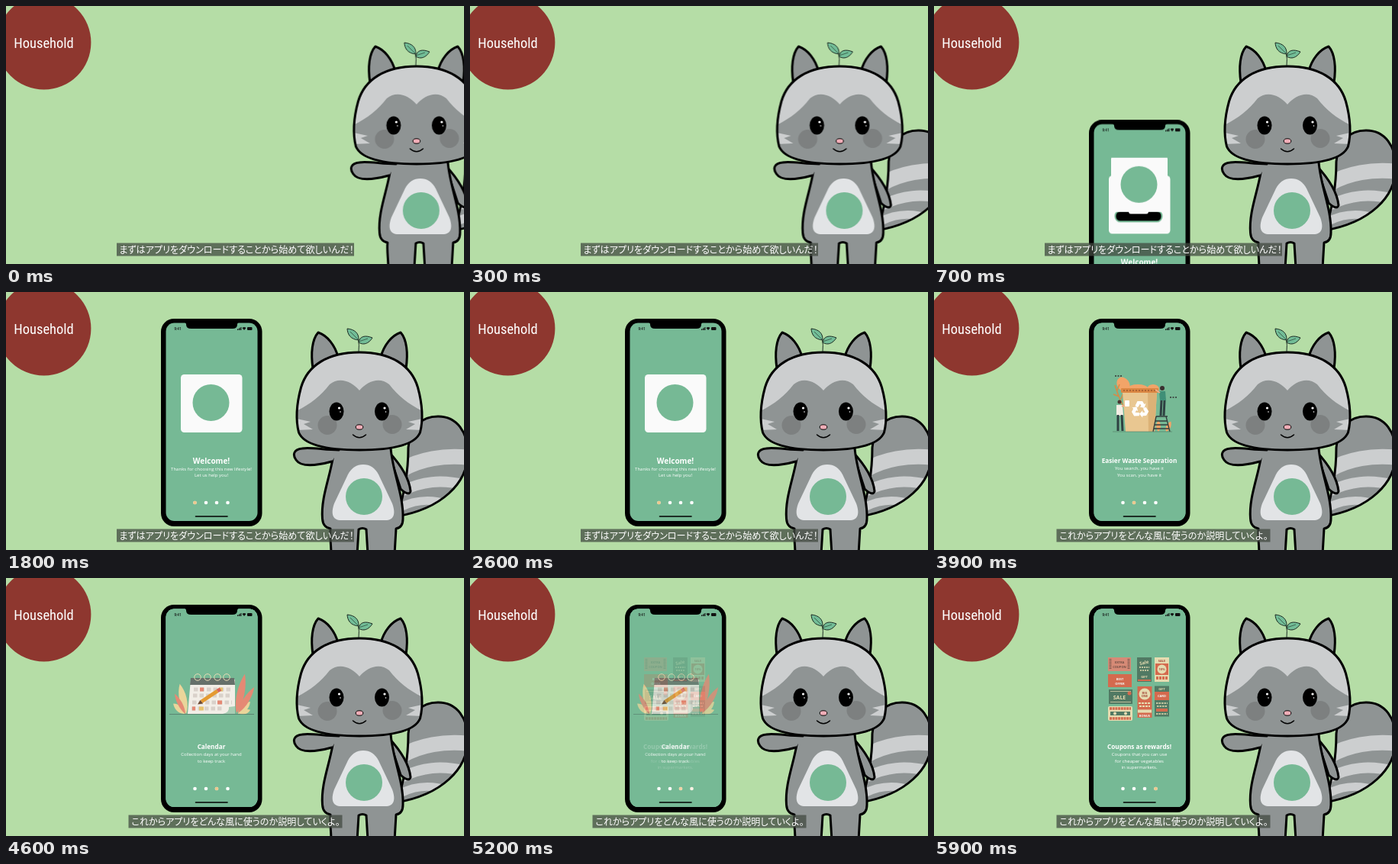
An HTML page that plays this animation: 600x338 px, repeating every 6000 ms.

```html
<!DOCTYPE html>
<html lang="ja">
<head>
<meta charset="utf-8">
<title>Household</title>
<style>
html, body { margin: 0; width: 100%; height: 100%; overflow: hidden; background: #b5dda6; }
svg { display: block; width: 100vw; height: 100vh; }
text { font-family: "Open Sans", "Noto Sans", sans-serif; text-anchor: middle; fill: #fff; }
.line { fill: none; stroke: #000; stroke-width: 3; stroke-linecap: round; stroke-linejoin: round; }
.fur { fill: #8f9494; stroke: #000; stroke-width: 3; stroke-linejoin: round; stroke-linecap: round; }
.pale { fill: none; stroke: #cccecf; }
.title { font: 400 18.5px "Roboto Condensed", Roboto, sans-serif; font-stretch: condensed; }
.sub text { font: 12.1px "Noto Sans CJK JP", "Noto Sans CJK", sans-serif; font-feature-settings: "palt"; }
.sub rect { fill: #424a40; fill-opacity: .75; }
.head { font-size: 8.2px; font-weight: 700; }
.body { font-size: 6px; }
.tiny { font-size: 4px; font-weight: 700; }
.on { fill: #ecc88e; }
.cream { fill: #efdfb4; }
.red { fill: #dc6549; }
.dark { fill: #4f7560; }
.slide, .phone, .panel, .sub, .screen { animation: 6s linear infinite; }
.slide { animation-name: slide; }
.phone { animation-name: rise; }
.panel { animation-name: lead; }
.first { animation-name: before; }
.second { animation-name: after; }
.waste { animation-name: waste; }
.calendar { animation-name: calendar; }
.coupons { animation-name: coupons; }
@keyframes slide {
  0% { transform: translateX(75px); animation-timing-function: ease-out; }
  9.5%, 100% { transform: none; }
}
@keyframes rise {
  0%, 5% { transform: translateY(304px); animation-timing-function: ease-in-out; }
  16.667%, 100% { transform: none; }
}
@keyframes lead {
  0%, 5% { transform: translateY(-68px); animation-timing-function: ease-in-out; }
  16.667%, 100% { transform: none; }
}
@keyframes before { 0%, 48.3% { opacity: 1; } 48.31%, 100% { opacity: 0; } }
@keyframes after { 0%, 48.3% { opacity: 0; } 48.31%, 100% { opacity: 1; } }
@keyframes waste { 0%, 48.3% { opacity: 0; } 51.5%, 100% { opacity: 1; } }
@keyframes calendar { 0%, 66% { opacity: 0; } 69%, 100% { opacity: 1; } }
@keyframes coupons { 0%, 86% { opacity: 0; } 89%, 100% { opacity: 1; } }
</style>
</head>
<body>
<svg viewBox="0 0 600 338">
<defs>
  <path id="skull" d="M463 79C504 79 531 96 539.500 125C545.500 147 546.500 168 542.500 184C535 202 500 207 463 207C426 207 391 202 383.500 184C379.500 168 380.500 147 386.500 125C395 96 422 79 463 79Z"/>
  <path id="tail" d="M527 204C529 177 544 163 566 163C591 163 605 184 605 211C605 251 570 284 512 294C521 268 527 240 527 204Z"/>
  <clipPath id="inSkull"><use href="#skull"/></clipPath>
  <clipPath id="inTail"><use href="#tail"/></clipPath>
  <path id="ear" class="fur" d="M402 100C399 80 401 62 409 53C421 57 431 70 435 85Z"/>
  <path id="tuft" d="M376 165L399 170L390 173L402 180L378 181Z" fill="#cccecf"/>
  <g id="base">
    <rect x="209.500" y="40.500" width="120" height="259.500" rx="11" fill="#76b995"/>
    <g fill="#fff">
      <circle cx="247.5" cy="276" r="2.3"/><circle cx="262" cy="276" r="2.3"/>
      <circle cx="276" cy="276" r="2.3"/><circle cx="290.5" cy="276" r="2.3"/>
    </g>
    <path d="M248.500 294H290" stroke="#000" stroke-width="1.6" stroke-linecap="round"/>
  </g>
  <path id="arrow" d="M-3.500 -9H3L5.500 -5L7.500 -6L5.500 0L-.5 -1.500L1.500 -2.700L0 -5.500L-3 -.8L-6.500 -3Z"/>
  <path id="leaf" d="M0 0C-7 -7 -6 -18 0 -25C6 -18 7 -7 0 0Z"/>
</defs>

<rect width="600" height="338" fill="#b5dda6"/>
<circle cx="49.700" cy="47.800" r="61.700" fill="#8e372f"/>
<text class="title" x="49.500" y="54.500">Household</text>

<g class="phone">
  <rect x="203" y="35" width="132.500" height="272" rx="17"/>

  <g>
    <use href="#base"/>
    <circle class="on" cx="247.500" cy="276" r="2.300"/>
    <rect x="229" y="108" width="80.500" height="76" rx="4.500" fill="#fafafa"/>
    <rect x="237.500" y="154" width="61" height="14" rx="6.500" stroke="#76b995" stroke-width="2"/>
    <rect x="255" y="152" width="26" height="6" rx="3" fill="#fafafa"/>
    <g class="panel">
      <rect x="232" y="110" width="74" height="71" rx="1" fill="#fafafa"/>
      <circle cx="268.500" cy="145" r="24" fill="#76b995"/>
    </g>
    <text class="head" x="269" y="224.500" style="font-size:10px">Welcome!</text>
    <text class="body" x="269" y="233.500">Thanks for choosing this new lifestyle!</text>
    <text class="body" x="269" y="242">Let us help you!</text>
  </g>

  <g class="screen waste">
    <use href="#base"/>
    <circle class="on" cx="262" cy="276" r="2.300"/>
    <g fill="#f2a468">
      <ellipse cx="248" cy="121" rx="8" ry="10" transform="rotate(-35 248 121)"/>
      <ellipse cx="267" cy="126" rx="13" ry="5"/>
      <ellipse cx="287" cy="127" rx="8" ry="6"/>
      <use href="#leaf" transform="translate(294 183) scale(.6)"/>
      <use href="#leaf" transform="translate(304 183) rotate(25) scale(.6)"/>
    </g>
    <path d="M248 150Q241 136 237 122M243 137L235 134M245 140L249 130M240 129L243 121" fill="none" stroke="#d98a45" stroke-width="1.500"/>
    <path d="M247 131H292L289 183H251Z" fill="#e9c791"/>
    <path d="M280 131H292L289 183H281Z" fill="#dcb277"/>
    <rect x="245" y="126" width="49" height="6" rx="1" fill="#db8743"/>
    <path d="M248 129H292" stroke="#9e592f" stroke-width="1.500" stroke-dasharray="2 2"/>
    <g fill="#fff" transform="translate(270 154)">
      <use href="#arrow" transform="translate(0 -2)"/>
      <use href="#arrow" transform="rotate(120) translate(0 -2)"/>
      <use href="#arrow" transform="rotate(240) translate(0 -2)"/>
    </g>
    <circle cx="243" cy="144" r="2.500" fill="#4a3530"/>
    <path d="M239 148H247L248 162H239Z" fill="#f4eee4"/>
    <path d="M246 150L254 147" stroke="#efb08a" stroke-width="2"/>
    <rect x="250" y="142" width="6" height="8" rx="1" fill="#fff"/>
    <path d="M241 161V182M246 161L247 182" stroke="#2e4142" stroke-width="3"/>
    <circle cx="299" cy="126" r="3" fill="#3a3030"/>
    <path d="M295 130H303L304 142H296Z" fill="#3f8f77"/>
    <path d="M296 132L290 128" stroke="#efb08a" stroke-width="2"/>
    <path d="M298 142L297 162M302 142L301 162" stroke="#2e4142" stroke-width="3"/>
    <path d="M291 163H306M291 163L287 183M304 163L309 183M290 169H306M289 174H307M288 179H308" fill="none" stroke="#323d3d" stroke-width="1.300"/>
    <path d="M237 110H246M309 138H318" stroke="#333" stroke-width="1.500" stroke-dasharray="2 1.500"/>
    <path d="M234 183H312" stroke="#56836c" stroke-width=".7"/>
    <text class="head" x="269" y="223.500">Easier Waste Separation</text>
    <text class="body" x="269" y="233">You search, you have it</text>
    <text class="body" x="269" y="241.500">You scan, you have it</text>
  </g>

  <g class="screen calendar">
    <use href="#base"/>
    <circle class="on" cx="276" cy="276" r="2.300"/>
    <g fill="#ead59a">
      <use href="#leaf" transform="translate(236 178) rotate(-12) scale(1 1.600)"/>
      <use href="#leaf" transform="translate(234 178) rotate(-48) scale(.8)"/>
      <use href="#leaf" transform="translate(304 178) rotate(45) scale(.9)"/>
      <use href="#leaf" transform="translate(306 178) rotate(70) scale(.6)"/>
    </g>
    <g fill="#e58974">
      <use href="#leaf" transform="translate(235 178) rotate(-28) scale(.6 1.200)"/>
      <use href="#leaf" transform="translate(302 177) rotate(12) scale(1 2.100)"/>
      <use href="#leaf" transform="translate(304 177) rotate(32) scale(.8 1.600)"/>
    </g>
    <path d="M214 178.500H325" stroke="#55796a" stroke-width=".8"/>
    <path d="M242 133H300V178H238Z" fill="#f2eee7"/>
    <path d="M242 131H299L300 140H241Z" fill="#66706a"/>
    <g fill="none" stroke="#e9dcb5" stroke-width="1">
      <circle cx="251" cy="130" r="4.300"/><circle cx="264" cy="130" r="4.300"/>
      <circle cx="277" cy="130" r="4.300"/><circle cx="289" cy="130" r="4.300"/>
    </g>
    <path d="M246 146H296M245 154H296M244 163H296M243 171H284" stroke="#d9d1ca" stroke-width="5" stroke-dasharray="5.500 3"/>
    <path d="M254 146H259M277 163H283M244 171H248" stroke="#e58974" stroke-width="5"/>
    <path d="M279 146H284M253 171H259" stroke="#e7c36f" stroke-width="5"/>
    <path d="M300 168V178H284Q293 176 292 169Z" fill="#a7cdb3"/>
    <path d="M256 162L277 148" stroke="#e49a32" stroke-width="5"/>
    <path d="M277 148L281 145.500" stroke="#d76559" stroke-width="5"/>
    <path d="M254.500 160L258 164.500L251 165.500Z" fill="#6b4933"/>
    <text class="head" x="269" y="223.500">Calendar</text>
    <text class="body" x="269" y="233">Collection days at your hand</text>
    <text class="body" x="269" y="241.500">to keep track</text>
  </g>

  <g class="screen coupons">
    <use href="#base"/>
    <circle class="on" cx="290.500" cy="276" r="2.300"/>
    <g opacity=".93">
      <rect x="228" y="104" width="30" height="18" fill="#de8774"/>
      <path d="M231 106V120M255 106V120" stroke="#784f46" stroke-width="3" stroke-dasharray="1 1"/>
      <text class="tiny" x="243" y="112" style="fill:#6e473f">EXTRA</text>
      <text class="tiny" x="243" y="118" style="fill:#6e473f">COUPON</text>
      <rect class="red" x="228" y="126" width="31" height="17"/>
      <text class="tiny" x="243.500" y="133.500">BEST</text>
      <text class="tiny" x="243.500" y="139.500">OFFER</text>
      <rect class="dark" x="229" y="146" width="31" height="19"/>
      <path d="M231 148.500H258M231 162.500H258" stroke="#efdfb4" stroke-width=".7"/>
      <text x="243" y="158.500" style="font-size:7px;font-weight:700;fill:#efdfb4">SALE</text>
      <circle class="red" cx="256" cy="151" r="2.500"/>
      <rect class="cream" x="228" y="168" width="32" height="19" rx="2"/>
      <path d="M230 171H258M230 184H258" stroke="#dc6549" stroke-width="3.500" stroke-dasharray="3 .7"/>
      <rect class="dark" x="231" y="175" width="26" height="5"/>
      <circle class="cream" cx="237" cy="177.500" r="2"/><circle class="cream" cx="251" cy="177.500" r="2"/>

      <rect class="dark" x="266" y="104" width="19" height="32"/>
      <text class="tiny" x="275.500" y="113" style="font-size:6px;fill:#efdfb4" transform="rotate(-12 275 112)">Sale</text>
      <path d="M269 117H282M270 121H281" stroke="#efdfb4" stroke-width="1.500" stroke-dasharray="2 1"/>
      <text class="tiny" x="275.500" y="130.500" style="fill:#efdfb4">GIFT</text>
      <path d="M267 134H284" stroke="#dc6549" stroke-width="2"/>
      <rect class="red" x="266.500" y="142" width="19" height="41"/>
      <circle class="cream" cx="276" cy="152" r="7.500"/>
      <text class="tiny" x="276" y="151.500" style="fill:#a94534">BIG</text>
      <text class="tiny" x="276" y="156" style="fill:#a94534">ONE</text>
      <path d="M268 164H284M269 168H283" stroke="#efdfb4" stroke-width="2" stroke-dasharray="3 1"/>
      <rect class="cream" x="267" y="172.500" width="18" height="4"/>
      <text class="tiny" x="276" y="181.500">BONUS</text>

      <rect class="cream" x="289" y="104" width="19" height="32"/>
      <rect class="red" x="290" y="112" width="17" height="15"/>
      <circle class="cream" cx="298.500" cy="119.500" r="6"/>
      <text class="tiny" x="298.500" y="121" style="fill:#a94534">10%</text>
      <text class="tiny" x="298.500" y="110" style="fill:#a94534">SALE</text>
      <path d="M291 131H306" stroke="#dc6549" stroke-width="4" stroke-dasharray="3 1"/>
      <rect class="dark" x="289" y="141.500" width="19" height="40"/>
      <rect class="red" x="289" y="149" width="19" height="11"/>
      <text class="tiny" x="298.500" y="147" style="fill:#efdfb4">GIFT</text>
      <text class="tiny" x="298.500" y="156">CARD</text>
      <path d="M291 164H306M292 168H305M291 178H306" stroke="#efdfb4" stroke-width="1.500" stroke-dasharray="2.500 1"/>
      <rect class="red" x="291" y="171" width="15" height="4"/>
    </g>
    <text class="head" x="269" y="223.500">Coupons as rewards!</text>
    <text class="body" x="269" y="233">Coupons that you can use</text>
    <text class="body" x="269" y="241.500">for cheaper vegetables</text>
    <text class="body" x="269" y="250">in supermarkets.</text>
  </g>

  <path d="M232 39H307Q303 40 303 42.500Q303 48 296.500 48H242.500Q236 48 236 42.500Q236 40 232 39Z"/>
  <text x="225" y="50" style="font-size:4.500px;font-weight:600;fill:#111">9:41</text>
  <path d="M303.500 50V48.500M305 50V47.700M306.500 50V46.800M308 50V46" stroke="#111"/>
  <path d="M309.500 47Q312 45 314.500 47L312 50Z" fill="#111"/>
  <rect x="316" y="46" width="6.500" height="4" rx="1" fill="#111"/>
</g>

<g class="slide">
  <use href="#tail" fill="#8f9494"/>
  <g class="pale" clip-path="url(#inTail)">
    <path d="M518 233C542 219 574 213 608 217" stroke-width="20"/>
    <path d="M518 261C545 248 570 245 602 253" stroke-width="14"/>
    <path d="M510 286C532 272 554 270 580 278" stroke-width="11"/>
  </g>
  <use href="#tail" class="line"/>

  <path class="fur" d="M501 209C515 224 528 242 530 261C529 266 523 264 517 258Z"/>
  <path class="fur" d="M430 204C428 235 412 266 414.500 297C415 305 419 309 425 310C424 320 426 331 426 344H460L462 311Q467 308 472 311L474 344H509L511 310C517 309 520 304 520 297C521 266 506 235 504 204Z"/>
  <path d="M468 226C477 226 483 230 488 239L506 277C511 291 508 299 497 299H439C428 299 425 291 430 277L448 239C453 230 459 226 468 226Z" fill="#e2e4e6"/>
  <circle cx="469" cy="268" r="24" fill="#76b995"/>
  <path class="fur" d="M436 207C417 207 399 203 388 205C377 206 375 213 380 220C386 229 405 228 427 222" style="stroke-linejoin:round"/>

  <use href="#ear"/>
  <use href="#ear" transform="translate(926) scale(-1 1)"/>
  <use href="#skull" fill="#cccecf"/>
  <g clip-path="url(#inSkull)">
    <path d="M376 158C396 149 412 137 424 121C436 111 452 116 463 129C474 116 490 111 502 121C514 137 530 149 550 158V210H376Z" fill="#8f9494"/>
    <use href="#tuft"/>
    <use href="#tuft" transform="translate(926) scale(-1 1)"/>
  </g>
  <use href="#skull" class="line"/>
  <g fill="#7d8080">
    <circle cx="421" cy="174.500" r="12.500"/><circle cx="506" cy="173.500" r="12.500"/>
  </g>
  <ellipse cx="433" cy="156.500" rx="9.500" ry="12"/>
  <ellipse cx="492.500" cy="156.500" rx="9.500" ry="12"/>
  <g fill="#fff">
    <circle cx="436.500" cy="152" r="1.600"/><circle cx="496" cy="152" r="1.600"/>
    <circle cx="438" cy="157" r=".8"/><circle cx="497.500" cy="157" r=".8"/>
  </g>
  <ellipse cx="463" cy="177" rx="4.800" ry="3.200" fill="#f3aeb8" stroke="#000" stroke-width="1"/>
  <path class="line" d="M454.500 187Q463 194.500 471.500 187" style="stroke-width:1.500"/>
  <g fill="#72bd97" stroke="#1c2b23" stroke-width="1">
    <path d="M462 78Q463 69 461.500 62" fill="none"/>
    <path d="M462 63C451.500 62 447.500 56 447 48C457 49 462.500 54 462 63Z"/>
    <path d="M462 66C463.500 58 470 56 480 60C475 68 468 70 462 66Z"/>
    <path d="M461 62L451 52M462 65L474 61" fill="none" stroke-width=".6"/>
  </g>
</g>

<g class="sub first">
  <rect x="145" y="310.500" width="311" height="17"/>
  <text x="302" y="323.700">まずはアプリをダウンロードすることから始めて欲しいんだ！</text>
</g>
<g class="sub second">
  <rect x="160.500" y="310.500" width="280" height="17"/>
  <text x="301" y="323.700">これからアプリをどんな風に使うのか説明していくよ。</text>
</g>
</svg>
</body>
</html>
```
